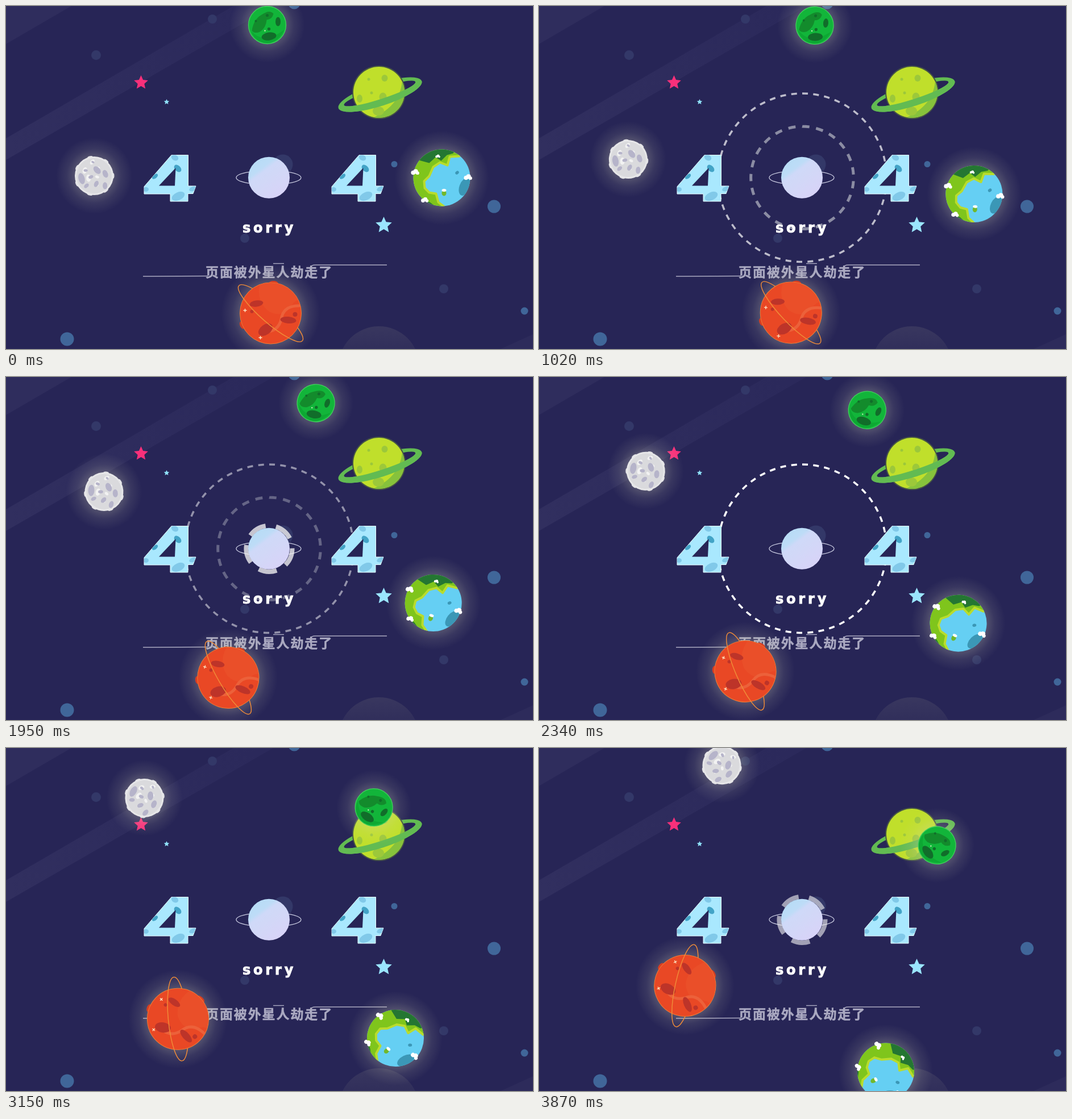
An HTML page for the animation above (3.9 s loop, 927x604 px).

```html
<!DOCTYPE html>
<html lang="zh">
<head>
<meta charset="utf-8">
<title>404</title>
<style>
html, body { margin: 0; width: 100%; height: 100%; overflow: hidden; background: #272556; }
svg { display: block; width: 927px; height: 604px; }
.sorry { font: bold 24px "DejaVu Sans", sans-serif; letter-spacing: 4.8px; fill: #fff; stroke: #fff; stroke-width: .9px; }
.note { font: 900 23px "Noto Sans CJK SC", "Noto Sans CJK", sans-serif; letter-spacing: 1.9px; fill: #aaa9c1; stroke: #aaa9c1; stroke-width: .5px; }
</style>
</head>
<body>
<svg id="stage" viewBox="0 0 927 604" xmlns="http://www.w3.org/2000/svg"></svg>
<script>
const LOOP = 3900, STEP = 30;
const rad = deg => deg * Math.PI / 180;

const oval = (x, y, rx, ry, fill, turn = 0, more = '') =>
  `<ellipse cx="${x}" cy="${y}" rx="${rx}" ry="${ry}" fill="${fill}" transform="rotate(${turn} ${x} ${y})" ${more}/>`;
const disc = (x, y, r, fill, more) => oval(x, y, r, r, fill, 0, more);
const path = (d, fill, more = '') => `<path d="${d}" fill="${fill}" ${more}/>`;
const line = (d, color, width) => path(d, 'none', `stroke="${color}" stroke-width="${width}"`);
const at = (x, y, body) => `<g transform="translate(${x} ${y})">${body}</g>`;
const repeat = (n, make) => Array.from({ length: n }, (_, i) => make(i)).join('');
const clip = (id, body) => `<g clip-path="url(#${id})">${body}</g>`;

// Craters spread over a disc in a sunflower spiral
const craters = (n, r, size, fill, phase) => repeat(n, i => {
  const a = rad(phase + i * 137.5), d = r * Math.sqrt((i + 0.4) / n);
  const s = size * (0.5 + (i * 0.62 + 0.3) % 1);
  return oval(d * Math.cos(a), d * Math.sin(a), s, s * 0.65, fill, phase + i * 67);
});

function star(x, y, r, fill) {
  const points = Array.from({ length: 10 }, (_, i) => {
    const a = rad(i * 36 - 90), d = i % 2 ? r * 0.47 : r;
    return `${x + d * Math.cos(a)},${y + d * Math.sin(a)}`;
  });
  return `<polygon points="${points.join(' ')}" fill="${fill}"/>`;
}

function arc(r, from, to) {
  const spot = deg => `${r * Math.cos(rad(deg))} ${r * Math.sin(rad(deg))}`;
  return `M${spot(from)}A${r} ${r} 0 0 1 ${spot(to)}`;
}

function glow(id, r) {
  const full = r + 33;
  return `<radialGradient id="${id}"><stop offset="${r / full}" stop-color="#d8d7b8" stop-opacity=".24"/>
    <stop offset="${(r + 14) / full}" stop-color="#d8d7b8" stop-opacity=".1"/>
    <stop offset="1" stop-color="#d8d7b8" stop-opacity="0"/></radialGradient>` + disc(0, 0, full, `url(#${id})`);
}

const digit = 'M291 262.5H320.5V317H334L329 330.5H320V344H289V331H243V318Z';
const defs = `<defs>
  <linearGradient id="beam" gradientUnits="userSpaceOnUse" x1="0" y1="250" x2="440" y2="0">
    <stop stop-color="#312f5f"/><stop offset="1" stop-color="#2b295b"/></linearGradient>
  <linearGradient id="pearl" x1=".1" y1="0" x2=".85" y2="1">
    <stop stop-color="#b5dcf5"/><stop offset=".28" stop-color="#bddcf7"/><stop offset=".36" stop-color="#cfd9f8"/>
    <stop offset=".5" stop-color="#d1d8f7"/><stop offset="1" stop-color="#d9d2f8"/></linearGradient>
  <linearGradient id="dome" x1="0" y1="0" x2="0" y2="1">
    <stop stop-color="#39375f"/><stop offset=".4" stop-color="#2d2b59"/></linearGradient>
  <clipPath id="globe"><circle r="50"/></clipPath>
  <clipPath id="lime"><circle r="45"/></clipPath>
  <clipPath id="front"><path d="M-90 0H90V40H-90Z" transform="rotate(-18)"/></clipPath>
  <clipPath id="ember"><circle r="53.5"/></clipPath>
  <clipPath id="four"><path d="${digit}"/></clipPath>
</defs>`;

function backdrop() {
  const faint = '#333868', blue = '#406699';
  return path('M0 0H115L0 67Z', '#2f2d5d') + path('M0 233L400 0H470L0 271Z', 'url(#beam)') +
    path('M870 604L927 578V604Z', '#2d2b5b') +
    disc(363, 23, 8, faint) + disc(158.5, 86.5, 8.5, faint) + disc(770, 498, 8, faint) +
    disc(420, 409, 8, faint) + disc(487, 279, 17.5, faint) +
    disc(507, -5, 10.5, blue) + disc(683, 278.5, 5.5, blue) + disc(858.5, 353, 11.5, blue) +
    disc(912, 537, 6.5, blue) + disc(107.5, 586.5, 12, blue) + disc(656, 635, 71, 'url(#dome)') +
    star(237.5, 135, 13, '#f8307a') + star(282.5, 169, 5, '#8fe0f8') + star(664.5, 386, 15, '#9ae5fd');
}

function ringed() {
  const mark = '#9cc83a';
  const band = path('M-77 0A77 20 0 0 1 77 0A77 20 0 0 1 -77 0M-66 -2A66 10 0 0 0 66 -2A66 10 0 0 0 -66 -2',
    '#62bb52', 'fill-rule="evenodd" transform="rotate(-18)"');
  return at(656, 152, at(2, 4, band) + disc(0, 0, 47, '#465546') + disc(0, 0, 45, '#c0df2b') +
    clip('lime', path('M41 -32Q44 23 -16 47L54 53V-32Z', '#86c23c') +
      oval(10, -25, 5.5, 6, mark) + disc(-18, -23, 2.5, mark) + oval(-34, 11, 5, 7, mark) +
      disc(-13, 1, 2.5, mark) + oval(7, 8, 6.5, 7.5, mark) + oval(-1, 33, 10, 8, mark)) +
    at(2, 4, clip('front', band)));
}

function four(dx) {
  const teal = '#43a4c7', sky = '#81c9e9';
  return at(dx, 0, path(digit, '#a9e8fe', 'stroke="#e8f9ff" stroke-width="1" stroke-linejoin="round"') +
    clip('four', oval(297, 267, 6.5, 5, sky, 30) + oval(303, 335, 12, 7, sky, -25) +
      oval(246, 323, 5, 4, sky) + oval(329, 322, 7, 4, sky, -20) +
      oval(302, 286, 7.5, 5, teal, 45) + oval(262, 300, 6, 3.5, teal, -40)) +
    path('M298.5 285L269 316.5H297Z', '#272556'));
}

function dashes(id, r, count, width, color) {
  return `<circle id="${id}" r="${r}" fill="none" stroke="${color}" stroke-width="${width}"
    pathLength="${count}" stroke-dasharray=".52 .48" transform="rotate(-90)"/>`;
}

function zero() {
  return at(463, 302.3, dashes('far', 148.3, 48, 3.5, '#fff') + dashes('mid', 90.3, 23, 5, '#f0f4f0') +
    oval(-1, 0, 57, 12.5, 'none', 0, 'stroke="#c7c9df" stroke-width="1.3"') +
    `<g id="near">${repeat(5, i => line(arc(40.5, i * 72 - 1, i * 72 + 45), '#f4f4f4', 8))}</g>` +
    disc(-0.5, 0, 36.5, 'url(#pearl)'));
}

function caption() {
  const pale = '#aaa9c1';
  return `<text class="sorry" x="416" y="398.5">sorry</text>
    <text class="note" x="351" y="476.5">页面被外星人劫走了</text>` +
    line('M241 476L355 475.5', pale, 1.6) + line('M535 468V461Q536 456 545 456H670', pale, 1.7) +
    line('M470 453.5H489', pale, 1.4);
}

function moon() {
  return glow('halo1', 34) +
    repeat(7, i => oval(33 * Math.cos(i * 0.9), 33 * Math.sin(i * 0.9), 2.5, 5, '#e3e3e6', i * 51.6)) +
    disc(0, 0, 34, '#e6e6e8') + disc(0, 0, 31, '#dadadd') +
    craters(9, 27, 4.5, '#f2f2f2', 20) + craters(8, 27, 5.5, '#b6b4ca', 160) +
    oval(-22, 5, 5.5, 10, '#b6b4ca', -15);
}

function green() {
  const dark = '#116d2a';
  return glow('halo2', 33) + disc(0, 0, 33, '#12b53a', 'stroke="#42cf5d" stroke-width="1.3"') +
    path('M-28 11Q-5 36 30 8Q18 32 0 32Q-21 31 -28 11Z', '#0da833') +
    path('M-27 10Q-24 -10 -10 -18Q4 -28 11 -20Q9 -10 -1 -9Q-2 5 -13 12Q-22 16 -27 10Z', '#138b2c') +
    oval(19, -6, 4.5, 8, dark) + oval(3, 20, 13, 7, dark, -8) +
    disc(3, 7, 2.7, dark) + disc(0, -17, 2.5, dark) + disc(-20, -7, 2, dark) + disc(-4, 10, 1.2, '#c8f0b8');
}

function earth() {
  const cloud = (x, y, s) => at(x, y, `<g transform="scale(${s})">` +
    disc(-3, 1, 3.4, '#fff') + disc(1, -1, 3.7, '#fff') + disc(4, 1.5, 2.7, '#fff') + '</g>');
  const shore = 'M36 -60L31 -38L14 -37L10 -22L-3 -27L-15 -19L-22 -3L-31 6L-30 18L-22 26L-10 28L-6 43L6 52L-60 60V-60Z';
  const hills = 'M-44 -32L-28 -52H26L20 -43L9 -40L-1 -30L-11 -36L-22 -26ZM-60 22L-42 29L-33 39L-21 43L-6 54H-60Z';
  return glow('halo3', 50) + disc(0, 0, 50, '#65cff3') +
    clip('globe', path(shore, '#7fc51c', 'stroke="#b9dc2d" stroke-width="4" stroke-linejoin="round"') +
      path(hills, '#247632') +
      oval(40, 16, 9, 16, '#3b97b6', 20) + oval(27, -9, 3.5, 2.7, '#3b97b6', -40) +
      oval(4, 27, 4, 5, '#72b82b') + oval(4, 22, 4, 2.5, '#fff')) +
    cloud(-47, -10, 1.1) + cloud(46, -1, 1.1) + cloud(-30, 39, 1) + cloud(-7, -38, 0.65);
}

function ember() {
  const ring = sweep => path(`M-74 0A74 17 0 0 ${sweep} 74 0`, 'none',
    'stroke="#ef8b38" stroke-width="1.5" transform="rotate(41)"');
  const spark = (x, y) => line(`M${x - 3} ${y}h6M${x} ${y - 3}v6`, '#ffe9c8', 1.3);
  const mark = '#bd3429';
  return glow('halo4', 54) + ring(1) + oval(5, -53, 8, 4, '#d83d22') + oval(-50, 21, 4, 7, '#d83d22', -25) +
    disc(0, 0, 54, '#e94825', 'stroke="#f07c35"') +
    clip('ember', path('M-19 -53Q-26 -21 -3 -3Q22 9 35 -11Q44 -26 54 -23V-61Z', '#ea4f29') +
      line('M58 -13Q23 -16 19 9Q14 33 -11 33', '#ec613a', 5) +
      oval(-25, -17, 12, 5.5, mark, -8) + oval(31, 12, 14, 6, mark, 5) + oval(-9, 29, 14, 9, mark, -35) +
      disc(43, 2, 4, mark) + disc(-33, -3, 3, mark)) +
    ring(0) + spark(-45, -5) + spark(-18, 43);
}

const stage = document.getElementById('stage');
stage.innerHTML = defs + backdrop() + ringed() + zero() + four(0) + four(330) + caption() +
  at(464, 304.5, '<g id="orbit">' + at(-309, -5.5, moon()) + at(-4.5, -271, green()) +
    at(302.5, -2, earth()) + at(1.5, 236.5, ember()) + '</g>');

const pulses = [
  { id: 'far', start: 0, length: 1.56, every: 1.56, times: 2 },
  { id: 'mid', start: 0.63, length: 1.56, every: 1.56, times: 1 },
  { id: 'near', start: 1.4, length: 0.9, every: 2.2, times: 2 }
];
const orbit = document.getElementById('orbit');
for (const p of pulses) p.el = document.getElementById(p.id);

// Fades up and down in a straight line, then rests
function level(t, { start, length, every, times }) {
  const n = Math.floor((t - start) / every);
  if (n < 0 || n >= times) return 0;
  const part = (t - start - n * every) / length;
  return Math.max(0, 1 - Math.abs(2 * part - 1));
}

// Half a turn in 9.85 s, eased at both ends
function turn(t) {
  const p = t / 9.85;
  return 180 * p * p * (3 - 2 * p);
}

function draw(now) {
  const t = Math.floor(Math.max(0, now) % LOOP / STEP) * STEP / 1000;
  orbit.setAttribute('transform', `rotate(${turn(t)})`);
  for (const p of pulses) p.el.setAttribute('opacity', level(t, p));
}

const begin = performance.now();
function tick() {
  draw(performance.now() - begin);
  requestAnimationFrame(tick);
}
tick();
</script>
</body>
</html>
```
